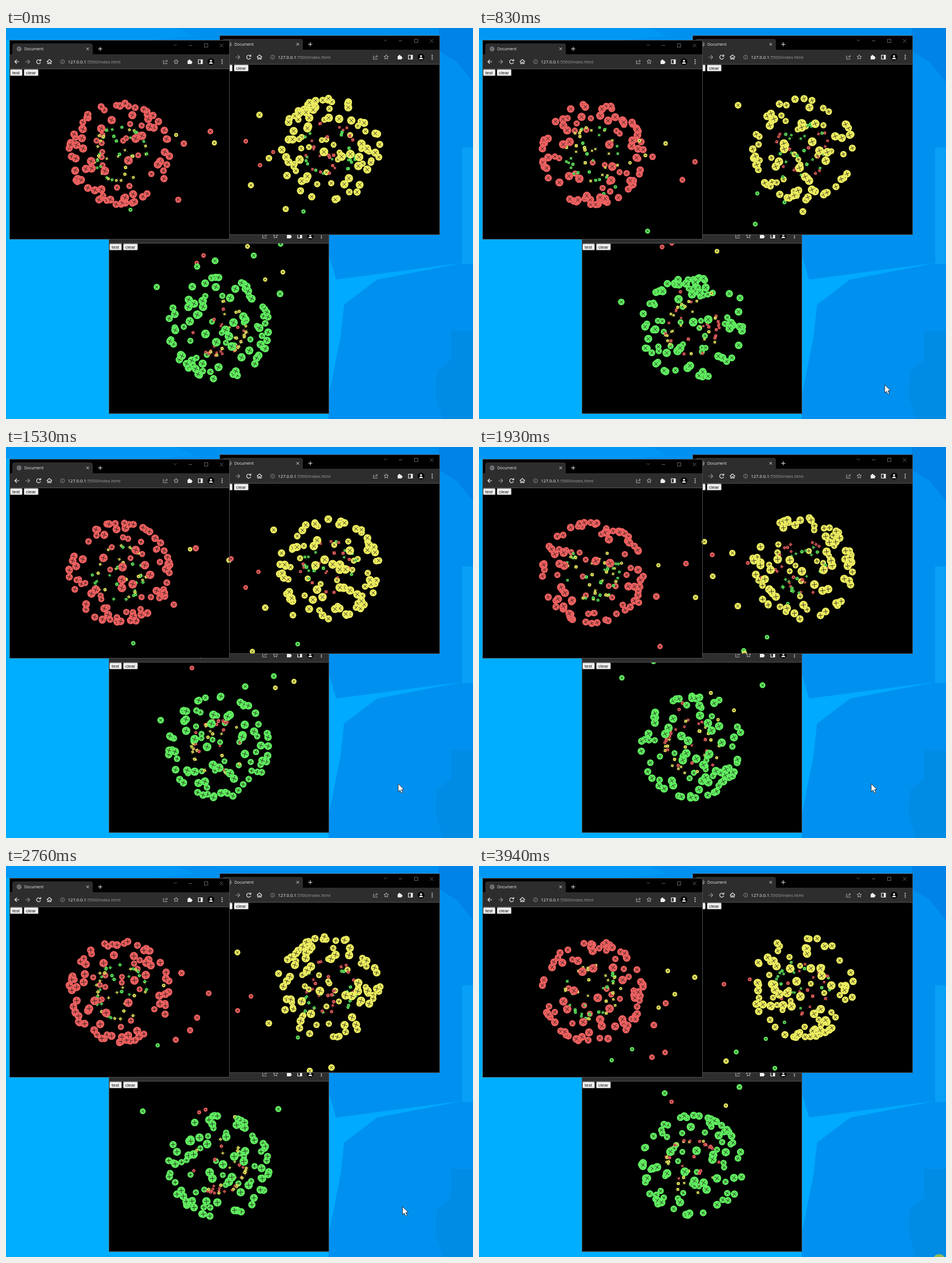
Recreate the animation shown at these times as an HTML page with a canvas. Size 818 by 684 pixels, loop 4000 ms.

```html
<!DOCTYPE html>
<html lang="en">
<head>
<meta charset="utf-8">
<title>Linked windows</title>
<style>
  html, body { margin: 0; width: 100%; height: 100%; overflow: hidden; background: #0091f0; }
  canvas { display: block; }
</style>
</head>
<body>
<canvas id="stage" width="818" height="684"></canvas>
<script>
const ctx = document.getElementById('stage').getContext('2d');
const LOOP = 4000, STEP = 76.9, LAST_STEP = 51;
const PERIOD = 1667, SPEED = 0.2, SPIN = 0.0023;
const UI = '"Open Sans", "Noto Sans", sans-serif';
const COLORS = ['#ec6060', '#ecec60', '#60ec60'];
const OFFSETS = [[0, 0], [368, -8], [174, 305]];
const HOMES = OFFSETS.map(([x, y]) => [199 + x, 220 + y]);

// Travellers: from, to, reference phase, then x,y pairs at that phase
const STREAMS = [
  [1, 0, 0, [365,201, 298,187, 444,152, 429,275]],
  [0, 1, 0, [358,181, 420,198, 445,240, 468,217]],
  [2, 0, 0, [218,318, 264,453]],
  [2, 1, 0, [480,465, 434,398, 481,378, 521,321]],
  [0, 2, 0, [346,398, 334,411]],
  [1, 2, 0, [423,382, 485,427, 454,440]],
  [1, 0, 633, [369,196, 334,224]],
  [0, 1, 633, [336,239, 315,276, 438,207]],
  [0, 2, 633, [328,335, 306,343, 340,421]],
  [2, 0, 633, [263,313, 320,390]],
  [2, 1, 633, [457,319, 461,379]],
  [1, 2, 633, [428,427, 430,350]]
];

// Pointer: time, x, y
const POINTER = [[560, 806, 690], [830, 712, 626], [1060, 693, 602], [1150, 687, 589],
  [2690, 687, 589], [3220, 738, 636], [3300, 749, 652], [3800, 781, 672], [3860, 800, 690]];

let seed = 41;
function random() {
  seed = (seed * 16807) % 2147483647;
  return seed / 2147483647;
}

const orbits = [];
function addOrbits(count, home, color, radius, size) {
  for (let i = 0; i < count; i++) {
    const tilt = random() * 2 - 1, turn = random() * 2 * Math.PI;
    orbits.push({ home, color, radius, size, tilt, lift: Math.sqrt(1 - tilt * tilt),
      cos: Math.cos(turn), sin: Math.sin(turn), start: random() * 2 * Math.PI });
  }
}
for (let h = 0; h < 3; h++) {
  for (let c = 0; c < 3; c++) {
    if (c === h) addOrbits(92, h, c, 89, 6.4);
    else addOrbits(22, h, c, 48, 2.5);
  }
}

function orbitBall(o, time, angle) {
  const a = o.start + time * SPIN, c = Math.cos(a), s = Math.sin(a);
  const z = s * o.lift;
  return {
    x: HOMES[o.home][0] + o.radius * (c * o.cos - s * o.sin * o.tilt),
    y: HOMES[o.home][1] + o.radius * (c * o.sin + s * o.cos * o.tilt),
    z: z * o.radius, r: o.size * (1 + 0.2 * z), color: o.color,
    angle: angle + (o.home === 1 ? 22 : 0), small: o.size < 4
  };
}

function travellers(time) {
  const balls = [];
  for (const [from, to, phase, points] of STREAMS) {
    const [hx, hy] = HOMES[to];
    for (let i = 0; i < points.length; i += 2) {
      const dx = points[i] - hx, dy = points[i + 1] - hy, far = Math.hypot(dx, dy);
      for (let k = -1; k < 2; k++) {
        const d = far - SPEED * (time % PERIOD - phase + k * PERIOD);
        if (d < 48 || d > 285) continue;
        balls.push({ x: hx + dx * d / far, y: hy + dy * d / far, z: 0,
          r: 2 + 0.0145 * d, color: from, angle: 45 });
      }
    }
  }
  return balls;
}

function rect(x, y, w, h, color) {
  ctx.fillStyle = color;
  ctx.fillRect(x, y, w, h);
}

function disc(x, y, r, color) {
  ctx.fillStyle = color;
  ctx.beginPath();
  ctx.arc(x, y, r, 0, 7);
  ctx.fill();
}

function shape(points, color) {
  ctx.fillStyle = color;
  ctx.fill(new Path2D('M' + points + 'Z'));
}

function line(path, color, width = 1) {
  ctx.strokeStyle = color;
  ctx.lineWidth = width;
  ctx.stroke(new Path2D(path));
}

function text(str, x, y, size, color, font = UI) {
  ctx.font = size + 'px ' + font;
  ctx.fillStyle = color;
  ctx.fillText(str, x, y);
  return x + ctx.measureText(str).width;
}

function cross(b, arm, color, width) {
  const a = b.angle * Math.PI / 180, c = Math.cos(a) * arm, s = Math.sin(a) * arm;
  ctx.strokeStyle = color;
  ctx.lineWidth = width;
  ctx.beginPath();
  ctx.moveTo(b.x - c, b.y - s);
  ctx.lineTo(b.x + c, b.y + s);
  ctx.moveTo(b.x + s, b.y - c);
  ctx.lineTo(b.x - s, b.y + c);
  ctx.stroke();
}

function drawBall(b) {
  if (b.small) cross(b, 5.5, COLORS[b.color] + '50', 0.8);
  disc(b.x, b.y, b.r, COLORS[b.color]);
  cross(b, b.r * (b.small ? 0.45 : 0.62), 'rgba(20,15,10,.85)', b.small ? 0.6 : 0.9);
}

function drawDesktop() {
  rect(0, 0, 818, 684, '#0091f0');
  rect(0, 21, 300, 663, '#00aeff');
  rect(180, 370, 385, 314, '#00aeff');
  shape('0 0H300L330 14L260 21H0', '#0098f4');
  shape('565 395L578 440L800 411L650 440L592 484L586 540L565 645', '#00aaff');
  shape('758 0H818V95L790 60L758 40', '#0083e6');
  shape('805 530H780V580L755 600L752 640L765 684H818V530', '#008be4');
  rect(799, 209, 204, 204, '#08a0f6');
}

function button(label, x, w) {
  ctx.fillStyle = '#efefef';
  ctx.strokeStyle = '#777';
  ctx.lineWidth = 1;
  ctx.beginPath();
  ctx.roundRect(x + 0.5, 72.5, w - 1, 11, 1.5);
  ctx.fill();
  ctx.stroke();
  text(label, x + 4, 80.5, 8, '#111', '"Liberation Sans", Arial, sans-serif');
}

function starPath(x, y) {
  let path = '';
  for (let i = 0; i < 10; i++) {
    const r = i % 2 ? 1.9 : 4.2, a = i * Math.PI / 5;
    path += (i ? 'L' : 'M') + (x + r * Math.sin(a)) + ' ' + (y - r * Math.cos(a));
  }
  return path + 'Z';
}

function drawToolbar() {
  const white = '#e8e8e8', grey = '#8d8d8d';
  line('M23 59h-7.5m3.5-3.5l-3.5 3.5l3.5 3.5', white, 1.2);
  line('M34 59h7.5m-3.5-3.5l3.5 3.5l-3.5 3.5', grey, 1.2);
  line('M60 57A3.5 3.5 0 1 0 60.5 60m.3-5.5v3h-3', white, 1.2);
  line('M71.5 59l4.5-4l4.5 4m-7.5-.5v4h2V60h2v2.5h2v-4', white, 1.1);
  line('M95.5 59a3.5 3.5 0 1 0 7 0a3.5 3.5 0 1 0-7 0M99 58.5V61m0-4.4v1', grey, 0.9);
  const end = text('127.0.0.1', 108.5, 61.8, 7.6, '#f2f2f2');
  text(':5500/index.html', end, 61.8, 7.6, '#a0a0a0');
  line('M277 57h-1.5v5.5h6.5V61m-4.5-.5q.5-3 4.5-3m-1.5-2l2.5 2l-2.5 2', '#aaa', 0.9);
  line(starPath(298, 59), '#bbb', 0.9);
  rect(318, 57, 7, 6, '#eee');
  disc(321.2, 56.5, 1.6, '#eee');
  disc(325, 60, 1.6, '#eee');
  line('M337 55.5h7v7h-7Z', '#eee', 1.2);
  rect(341, 55, 3, 8, '#eee');
  disc(359, 59, 6, '#050505');
  disc(359, 57.2, 1.8, '#eee');
  shape('355.7 62.5q0-2.8 3.3-2.8t3.3 2.8', '#eee');
  for (const y of [55.8, 59, 62.2]) disc(378.5, y, 1, '#e0e0e0');
}

function drawChrome() {
  rect(6, 21, 386, 349, '#4a4d50');
  rect(7, 22, 384, 347, '#000');
  ctx.fillStyle = '#2d2d2e';
  ctx.beginPath();
  ctx.roundRect(11, 27, 141, 24, 4);
  ctx.fill();
  rect(7, 46, 384, 25, '#2d2d2e');
  rect(7, 71, 384, 1, '#505254');
  disc(23, 36.5, 4.2, '#777a7d');
  line('M20 35.5l3 1l-1 2.5m1.5-6l2 3', '#3c3e40', 0.9);
  text('Document', 32, 39, 6.9, '#f0f0f0');
  line('M140.8 34.3l4.4 4.4m0-4.4l-4.4 4.4', '#ddd');
  line('M161.5 36.5h7M165 33v7', '#ddd', 1.1);
  line('M294 28.5l2.5 2.5l2.5-2.5M320 30.5h6M347.5 27.5h6v6h-6ZM374.5 27.5l6 6m0-6l-6 6', '#777', 0.8);
  drawToolbar();
  button('test', 7, 22);
  button('clear', 31, 26);
}

function drawWindow(index, balls) {
  const [dx, dy] = OFFSETS[index];
  ctx.save();
  ctx.translate(dx, dy);
  drawChrome();
  ctx.beginPath();
  ctx.rect(7, 72, 384, 297);
  ctx.clip();
  ctx.translate(-dx, -dy);
  balls.forEach(drawBall);
  ctx.restore();
  // Buttons stay above the moving balls
  ctx.save();
  ctx.translate(dx, dy);
  button('test', 7, 22);
  button('clear', 31, 26);
  ctx.restore();
}

function drawPointer(time) {
  if (time > 3850) return disc(806, 690, 11, '#8fbc52');
  const i = POINTER.findIndex(p => p[0] > time);
  if (i < 1) return;
  const [t0, x0, y0] = POINTER[i - 1], [t1, x1, y1] = POINTER[i];
  const k = (time - t0) / (t1 - t0);
  ctx.save();
  ctx.translate(x0 + (x1 - x0) * k, y0 + (y1 - y0) * k);
  const arrow = '0 0v14l3.2-2.8l2.4 5.3l2.4-1.1l-2.3-5.1l4.3-.3';
  shape(arrow, '#fff');
  line('M' + arrow + 'Z', '#111', 0.8);
  ctx.restore();
}

function draw(now) {
  const step = Math.min(LAST_STEP, Math.floor((now % LOOP + 20) / STEP));
  const time = step * STEP, angle = 25 + 26.65 * step;
  const balls = orbits.map(o => orbitBall(o, time, angle))
    .concat(travellers(time))
    .sort((a, b) => a.z - b.z);
  drawDesktop();
  for (const index of [2, 1, 0]) drawWindow(index, balls);
  drawPointer(time);
}

const begin = performance.now();
function tick() {
  draw(performance.now() - begin);
  requestAnimationFrame(tick);
}
tick();
</script>
</body>
</html>
```
